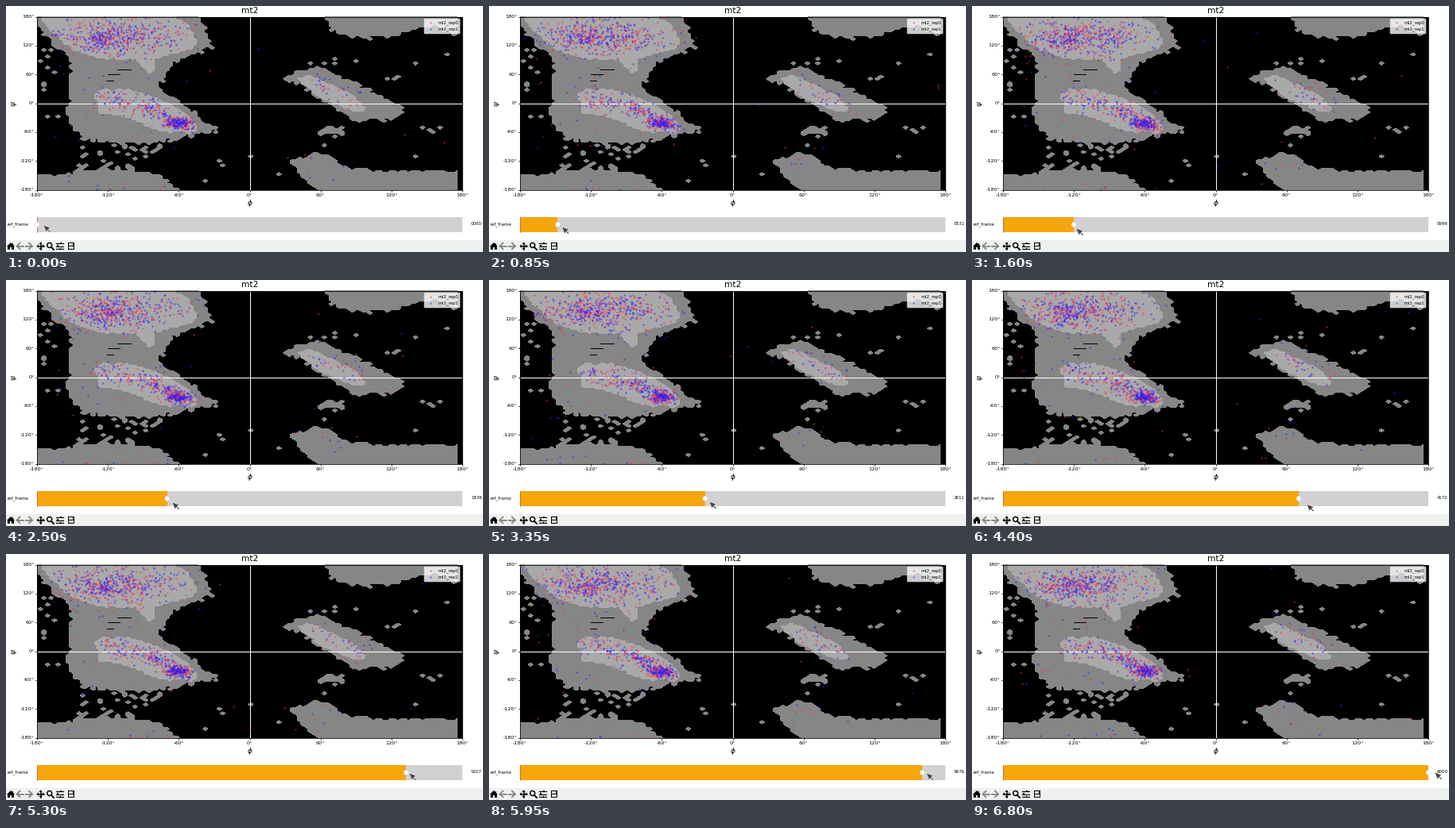
Write a matplotlib script that moves like this. It is 600x310 px and loops after 6850 ms.

```python
import numpy as np
import matplotlib.pyplot as plt
from matplotlib.animation import FuncAnimation
from matplotlib.patches import Circle, FancyBboxPatch, Polygon, Rectangle
from matplotlib.path import Path

W, H, DPI = 600, 310, 100
FRAMES, STEP = 137, 50
L, R, T, B = 39, 574, 13.5, 231.5
EDGE = 568
PX = 72 / DPI
DARK, LIGHT, ORANGE, BAR = "#868686", "#a9a9a9", "#f6a60a", "#f0f0f0"
RED, BLUE = "#ff2846", "#2a1eff"

plt.rcParams["font.family"] = "DejaVu Sans"
plt.rcParams["toolbar"] = "None"
fig = plt.figure(figsize=(W / DPI, H / DPI), dpi=DPI, facecolor="white")
ax = fig.add_axes([0, 0, 1, 1])
ax.set_xlim(0, W)
ax.set_ylim(H, 0)
ax.axis("off")


def text(x, y, s, px, ha="center", **kw):
    return ax.text(x, y, s, fontsize=px * PX, ha=ha, va="center", **kw)


def line(xs, ys, color="black", px=1.0, **kw):
    return ax.plot(xs, ys, color=color, lw=px * PX, **kw)[0]


def rect(x0, y0, x1, y1, color, **kw):
    return ax.add_patch(Rectangle((x0, y0), x1 - x0, y1 - y0,
                                  fc=color, lw=0, **kw))


def shape(pts, color, z=8, lw=0, **kw):
    return ax.add_patch(Polygon(pts, fc=color, zorder=z, lw=lw, **kw))


# --- density map -----------------------------------------------------------
NX, NY = 121, 79
rng = np.random.default_rng(4)
gx, gy = np.meshgrid(np.linspace(L, EDGE, NX), np.linspace(T, B, NY))
jx, jy = rng.normal(0, 1, (2, NY, NX))
dark, light = np.zeros((2, NY, NX))


def blob(field, rough, *pts):
    """Mark a polygon on the grid with a ragged outline."""
    probe = np.c_[(gx + rough * jx).ravel(), (gy + rough * jy).ravel()]
    field[Path(pts).contains_points(probe).reshape(NY, NX)] = 1


def scatter(n, x0, y0, x1, y1, value=1, wide=0):
    """Set isolated grid cells inside a box."""
    for x, y in zip(rng.uniform(x0, x1, n), rng.uniform(y0, y1, n)):
        i = round((y - T) / (B - T) * (NY - 1))
        j = round((x - L) / (EDGE - L) * (NX - 1))
        dark[i, j - wide:j + wide + 1] = value


blob(dark, 1.9, (38, 10), (39, 20), (50, 33), (62, 48), (76, 59), (86, 80),
     (77, 97), (83, 110), (77, 132), (86, 152), (96, 166), (150, 173),
     (178, 173), (250, 160), (267, 155), (248, 147), (225, 125), (187, 104),
     (203, 82), (207, 71), (257, 52), (250, 30), (235, 10))
blob(dark, 1.8, (350, 94), (365, 82), (398, 78), (415, 88), (440, 96),
     (466, 113), (502, 128), (493, 139), (440, 144), (405, 122), (372, 100))
blob(dark, 1.8, (361, 196), (385, 186), (404, 187), (428, 206), (480, 210),
     (575, 208), (575, 235), (395, 235), (372, 214))
blob(dark, 1.8, (30, 212), (60, 216), (95, 207), (145, 206), (190, 213),
     (222, 235), (30, 235))
blob(dark, 1.8, (405, 10), (409, 30), (432, 38), (490, 38), (512, 27),
     (540, 25), (575, 38), (575, 10))
blob(dark, 1.8, (395, 160), (406, 151), (428, 158), (416, 163))
blob(light, 0.8, (45, 10), (47, 21), (68, 42), (88, 57), (125, 67),
     (165, 66), (172, 81), (186, 82), (188, 66), (234, 53), (239, 44),
     (228, 24), (206, 10))
blob(light, 0.8, (113, 110), (122, 104), (158, 106), (205, 122), (228, 138),
     (243, 154), (232, 159), (195, 157), (150, 140), (117, 133))
blob(light, 0.8, (368, 92), (379, 87), (405, 96), (435, 112), (452, 130),
     (440, 134), (410, 122), (380, 104))

scatter(12, 44, 48, 66, 160)
scatter(34, 92, 174, 195, 206)
scatter(5, 368, 65, 444, 74)
scatter(3, 480, 89, 496, 93)
scatter(4, 512, 152, 550, 158)
scatter(3, 222, 182, 294, 222)
for x, y in ((306, 190), (514, 190), (345, 213), (402, 175), (515, 72),
             (555, 62)):
    scatter(1, x, y, x, y)
scatter(6, 125, 80, 162, 95, value=0, wide=1)

rect(L, T, R, B, "black", zorder=0)
ax.contourf(gx, gy, dark, levels=[0.3, 2], colors=[DARK], zorder=1)
ax.contourf(gx, gy, light, levels=[0.5, 2], colors=[LIGHT], zorder=2)
line([306.5, 306.5], [T, B], "white", zorder=3)
line([L, R], [122.5, 122.5], "white", zorder=3)
line([L, R, R, L, L], [T, T, B, B, T], px=0.8, zorder=5)

# --- axes text -------------------------------------------------------------
for deg in range(-180, 181, 60):
    x = L + (deg + 180) / 360 * (R - L)
    y = B - (deg + 180) / 360 * (B - T)
    line([x, x], [B, B + 2.2], px=0.7)
    line([L - 2.2, L], [y, y], px=0.7)
    text(x, 238.3, f"{deg}°", 6.5)
    text(35.5, y, f"{deg}°", 6.5, "right")
text(306.5, 6.2, "mt2", 10.6)
text(306.5, 248.5, r"$\phi$", 9)
text(10.5, 122.5, r"$\psi$", 9, rotation=90)


# --- samples ---------------------------------------------------------------
def marks(color, z):
    return ax.plot([], [], "o", ms=2.3 * PX, mew=0, color=color,
                   alpha=0.58, zorder=z)[0]


dots = [marks(c, 4) for c in (RED, BLUE)]


def band(r, n, a, b, spread):
    t = r.uniform(0, 1, (n, 1))
    return np.array(a) + t * np.subtract(b, a) + r.normal(0, spread, (n, 2))


def sample(r):
    sheet = r.normal((138, 38), (43, 12), (240, 2))
    sheet = sheet[(sheet[:, 0] > 55) & (sheet[:, 0] < 252)]
    pts = np.vstack([
        sheet,
        r.normal((122, 43), (12, 6), (35, 2)),
        r.normal((216, 147.5), (8, 3.6), (95, 2)),
        band(r, 60, (180, 128), (235, 153), 4.5),
        band(r, 55, (118, 113), (195, 130), 7),
        band(r, 20, (385, 92), (450, 124), 8),
        r.normal((395, 195), (18, 12), (5, 2)),
        r.uniform((60, 60), (210, 180), (14, 2)),
        r.uniform((L, T), (R, B), (6, 2)),
    ])
    return L + (pts[:, 0] - L) % (R - L), T + (pts[:, 1] - T) % (B - T)


# --- legend ----------------------------------------------------------------
ax.add_patch(FancyBboxPatch((527, 17), 43, 17, fc="white", ec="#cccccc",
                            lw=0.5, alpha=0.8, zorder=6,
                            boxstyle="round,pad=1,rounding_size=1"))
for k, c in enumerate((RED, BLUE)):
    y = 21 + 8.3 * k
    marks(c, 7).set_data([534], [y])
    text(543.5, y, f"mt2_rep{k}", 5.4, "left", zorder=7)

# --- slider ----------------------------------------------------------------
TOP, MID, BOT = 266.3, 275.4, 284.5
rect(L, TOP, R, BOT, "#d2d0d2")
fill = rect(L, TOP, L, BOT, ORANGE, zorder=2)
line([L, L], [TOP, BOT], "#c8642a", 0.8, zorder=3)
knob = ax.add_patch(Circle((L, MID), 3, fc="white", ec="#d8d8d8",
                           lw=0.4, zorder=4))
text(1.3, 275, "ref_frame", 5.5, "left")
label = text(585, 275, "0000", 5.4, "left")

# --- toolbar ---------------------------------------------------------------
CY = 302.5
rect(0, 294.5, W, H, BAR)
shape([(1, 303), (6, 298), (11, 303)], "black")
rect(2.4, 302.5, 9.6, 307, "black", zorder=8)
rect(8, 298.6, 9.4, 302, "black", zorder=8)
rect(5, 304, 7, 307, BAR, zorder=9)
for x, s in ((17.5, 1), (29, -1)):
    line([x - 3.5 * s, x + 4 * s], [CY, CY], "#858585", 1.8)
    line([x, x - 4 * s, x], [CY - 3.8, CY, CY + 3.8], "#858585", 1.8)
for d in np.array([(1, 0), (-1, 0), (0, 1), (0, -1)]):
    c = np.array((43.5, CY))
    side = d[::-1] * 2.2
    line(*zip(c, c + 4 * d), px=1.5)
    shape([c + 5 * d, c + 2.6 * d + side, c + 2.6 * d - side], "black")
ax.add_patch(Circle((54.7, 301.5), 3, fc="none", ec="black", lw=1.5 * PX))
line([57, 60], [304, 307], px=2)
for y, k in ((299, 69), (CY, 65), (306, 68.5)):
    line([63, 71.5], [y, y], px=1.2)
    rect(k - 0.9, y - 1.4, k + 0.9, y + 1.4, "black", zorder=8)
rect(77.8, 298.3, 86.3, 306.8, "black", zorder=8)
rect(79.2, 299.3, 83.5, 301.6, BAR, zorder=9)
rect(79.2, 303.2, 84.9, 306, BAR, zorder=9)

# --- pointer and motion ----------------------------------------------------
ARROW = np.array([(0, 0), (9.2, 3.6), (6.2, 5.2), (9.4, 8.4), (8.2, 9.6),
                  (5, 6.4), (3.6, 9.2)])
pointer = shape(ARROW, "#444444", 10, 0.4, ec="white")

# time, slider value, pointer x, pointer y
KEYS = np.array([
    (0, 0, 47, 276), (1600, 999, 131, 280), (2500, 1836, 209, 280),
    (3350, 2611, 277, 279), (4400, 4172, 421, 282.5),
    (5300, 5207, 507, 276), (6400, 6000, 580, 276), (6800, 6000, 582, 275),
]).T


def draw(i):
    value, px, py = (np.interp(i * STEP, KEYS[0], k) for k in KEYS[1:])
    x = L + value / 6000 * (R - L)
    fill.set_width(x - L)
    knob.center = (x, MID)
    label.set_text(f"{round(value):04d}")
    pointer.set_xy(ARROW + (px, py))
    r = np.random.default_rng(100 + i)
    for d in dots:
        d.set_data(*sample(r))
    return [fill, knob, label, pointer, *dots]


anim = FuncAnimation(fig, draw, frames=FRAMES, interval=STEP, repeat=True,
                     repeat_delay=0, blit=False)
plt.show()
```
